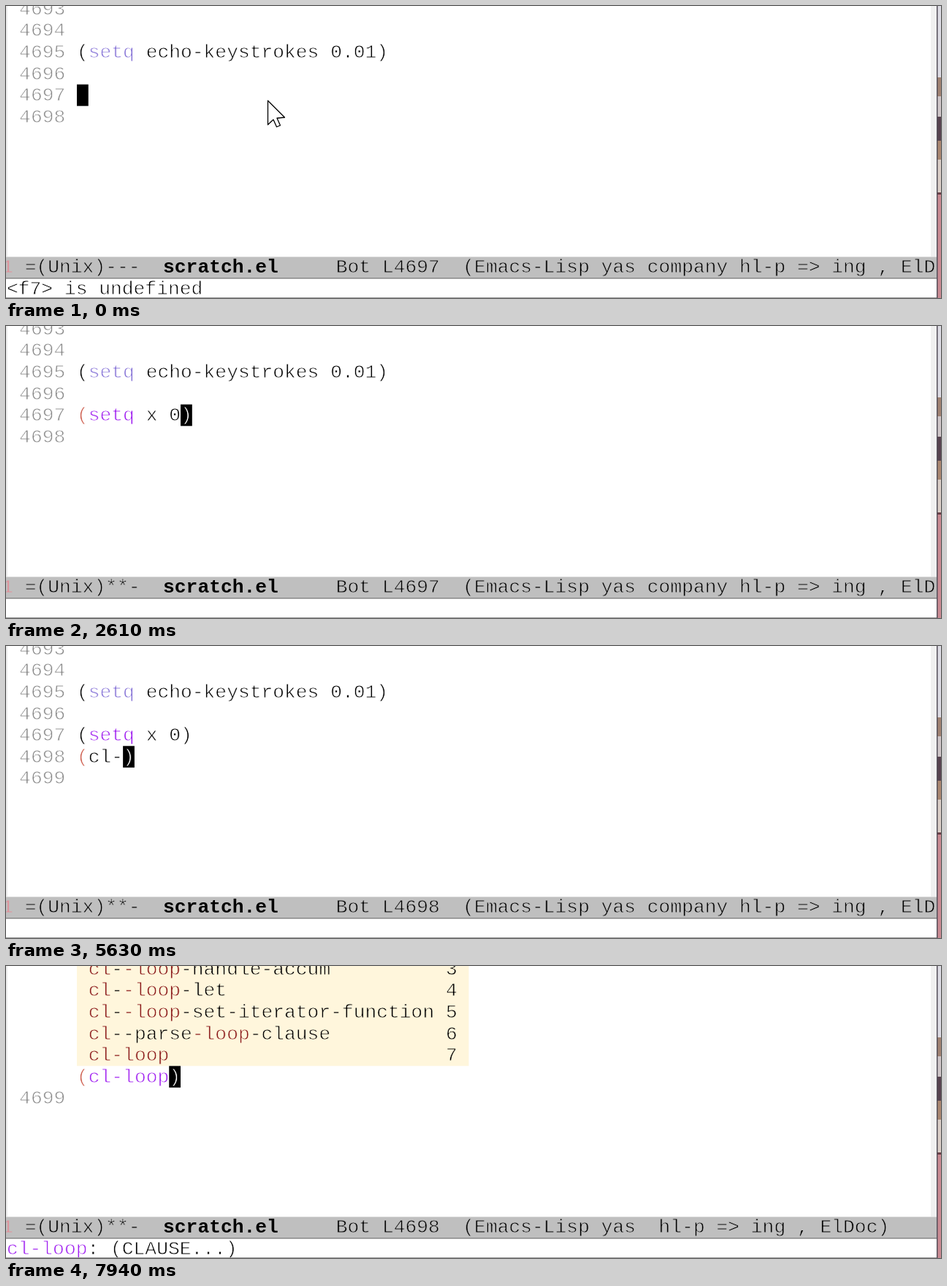
These frames come from a looping animation (1280x401 px, 8 s). An HTML page with a canvas:

```html
<!DOCTYPE html>
<html lang="en">
<head>
<meta charset="utf-8">
<title>Editor session</title>
<style>
  html, body { margin: 0; width: 100%; height: 100%; overflow: hidden; background: #fff; }
  canvas { display: block; }
</style>
</head>
<body>
<canvas id="stage" width="1280" height="401"></canvas>
<script>
const ctx = document.getElementById('stage').getContext('2d');
const LOOP = 8000, CELL = 15.78, PITCH = 29.6, LEFT = 97;
const FONT = '26.3px "Liberation Mono", monospace';
const INK = '#000', GRAY = '#8c8c8c', PURPLE = '#a020f0', FADED = '#8a78d8',
      RED = '#cd5c4c', MAROON = '#8b1a1a';
const PAPER = '#fff', POPUP = '#fff6dc', BAR = '#bfbfbf';

// [time, text before the cursor, text from the cursor on, buffer line]
const EDITS = [
  [0, '', '', 4697],
  [690, '(', ')', 4697],
  [1020, '(s', ')', 4697],
  [1220, '(se', ')', 4697],
  [1430, '(set', ')', 4697],
  [1640, '(setq', ')', 4697],
  [1840, '(setq ', ')', 4697],
  [2190, '(setq x', ')', 4697],
  [2400, '(setq x ', ')', 4697],
  [2610, '(setq x 0', ')', 4697],
  [2890, '(setq x 0)', '', 4697],
  [4050, '', '', 4698],
  [4680, '(', ')', 4698],
  [4900, '(c', ')', 4698],
  [5110, '(cl', ')', 4698],
  [5360, '(cl-', ')', 4698],
  [5750, '(cl-l', ')', 4698],
  [5960, '(cl-lo', ')', 4698],
  [6240, '(cl-loo', ')', 4698],
  [6450, '(cl-loop', ')', 4698]
];
const MESSAGES = [
  [0, '<f7> is undefined'],
  [690, ''],
  [3230, '0 (#o0, #x0, ?\\C-@)'],
  [4050, ''],
  [7200, 'cl-loop: (CLAUSE...)']
];
const LOOP_NAMES = ['cl--loop-handle-accum', 'cl--loop-let', 'cl--loop-set-iterator-function'];
const WIDE_LIST = ['cl--letf', 'cl--loop-build-ands', ...LOOP_NAMES];
const NARROW_LIST = [...LOOP_NAMES, 'cl--parse-loop-clause', 'cl-loop'];

const latest = (list, t) => list.filter(item => item[0] <= t).pop();
const baseline = line => 71 + (line - 4695) * PITCH;
const rowTop = line => 107.7 + (line - 4697) * PITCH;
const column = n => LEFT + n * CELL;

function rect(x, y, w, h, color) {
  ctx.fillStyle = color;
  ctx.fillRect(x, y, w, h);
}

// Draws text on the character grid; colorAt may be a color or a function of the index.
// Regular glyphs get a thin outline in the background color for a lighter weight.
function write(text, x, y, colorAt = INK, background = PAPER, bold = false) {
  ctx.font = (bold ? 'bold ' : '') + FONT;
  ctx.strokeStyle = background;
  ctx.lineWidth = 0.8;
  ctx.lineJoin = 'round';
  [...text].forEach((ch, i) => {
    ctx.fillStyle = typeof colorAt === 'function' ? colorAt(i) : colorAt;
    ctx.fillText(ch, x + i * CELL, y);
    if (!bold) ctx.strokeText(ch, x + i * CELL, y);
  });
}

function writeCode(text, line, parenColor = INK, keywordColor = PURPLE) {
  const keyword = /^\((setq|cl-loop)(?=[ )]|$)/.exec(text);
  const end = keyword ? keyword[0].length : 0;
  write(text, LEFT, baseline(line),
    i => i === 0 ? parenColor : i < end ? keywordColor : INK);
}

function drawCursor(col, line, under) {
  rect(column(col), rowTop(line), CELL, PITCH, INK);
  write(under, column(col), baseline(line), '#fff', INK);
}

function drawPopup(typed) {
  const wide = typed === 'l';
  const names = wide ? WIDE_LIST : NARROW_LIST;
  const bottom = rowTop(4698);
  rect(0, 0, 96, rowTop(4699), PAPER);
  rect(LEFT, 0, 34 * CELL, bottom, POPUP);
  if (wide) rect(column(34), 0, CELL, bottom, '#f3deb3');
  names.forEach((name, i) => {
    const y = baseline(4693 + i);
    const start = name.indexOf('-l');
    const matched = k => k < 2 || (k >= start && k <= start + typed.length);
    write(name, column(1), y, k => matched(k) ? MAROON : INK, POPUP);
    write(String((i + (wide ? 6 : 3)) % 10), column(32), y, INK, POPUP);
  });
}

function drawPointer() {
  ctx.beginPath();
  for (const [x, y] of [[0, 0], [23, 23], [12.5, 24], [17, 34], [12, 36], [7.5, 26], [0, 33]])
    ctx.lineTo(358.5 + x, 130 + y);
  ctx.closePath();
  ctx.fillStyle = '#fff';
  ctx.fill();
  ctx.strokeStyle = '#000';
  ctx.lineWidth = 1.3;
  ctx.stroke();
}

function drawModeLine(line, modified, completing) {
  rect(0, 344.5, 1274, 29.5, BAR);
  rect(0, 373.5, 1274, 1, '#606060');
  const x = 25.7, y = 366;
  const bar = (text, col, color = INK, bold = false) =>
    write(text, x + col * CELL, y, color, BAR, bold);
  bar('1', -2, '#e58a94');
  bar('=(Unix)' + (modified ? '**-' : '---'), 0);
  bar('scratch.el', 12, INK, true);
  const modes = completing ? 'yas  hl-p => ing , ElDoc)' : 'yas company hl-p => ing , ElD';
  bar(`Bot L${line}  (Emacs-Lisp ${modes}`, 27);
}

function drawEdges() {
  rect(0, 0, 2, 344, '#ececec');
  rect(1266, 0, 8, 344, '#f0f0f0');
  rect(0, 400, 1274, 1, '#a0a0a0');
  // Sliver of desktop beside the window
  const bands = [[0, '#dcdbe3'], [98, '#a08272'], [124, '#cfc6c8'], [152, '#57424f'],
    [185, '#a98670'], [211, '#d9cdc6'], [256, '#6a4048'], [259, '#c98a92']];
  for (const [y, color] of bands) rect(1274, y, 6, 401 - y, color);
  rect(1274, 0, 1.5, 401, '#55505a');
}

function draw(t) {
  const [, before, after, line] = latest(EDITS, t);
  const message = latest(MESSAGES, t)[1];
  const typed = before.startsWith('(cl-') ? before.slice(4) : '';
  rect(0, 0, 1280, 401, PAPER);

  const lastLine = line + 1;
  for (let n = 4693; n <= lastLine; n++) write(String(n), column(-5), baseline(n), GRAY);
  writeCode('(setq echo-keystrokes 0.01)', 4695, INK, FADED);
  if (line === 4698) writeCode('(setq x 0)', 4697);
  if (typed) drawPopup(typed);

  const enclosed = after && (line === 4698 || t >= 2050);
  writeCode(before + after, line, enclosed ? RED : INK);
  drawCursor(before.length, line, after);
  if (t < 690) drawPointer();

  drawModeLine(line, t >= 690, typed !== '');
  const nameEnd = message.indexOf(':');
  write(message, 1, 396, i => i < nameEnd ? PURPLE : INK);
  drawEdges();
}

function frame() {
  draw(performance.now() % LOOP);
  requestAnimationFrame(frame);
}
frame();
</script>
</body>
</html>
```
